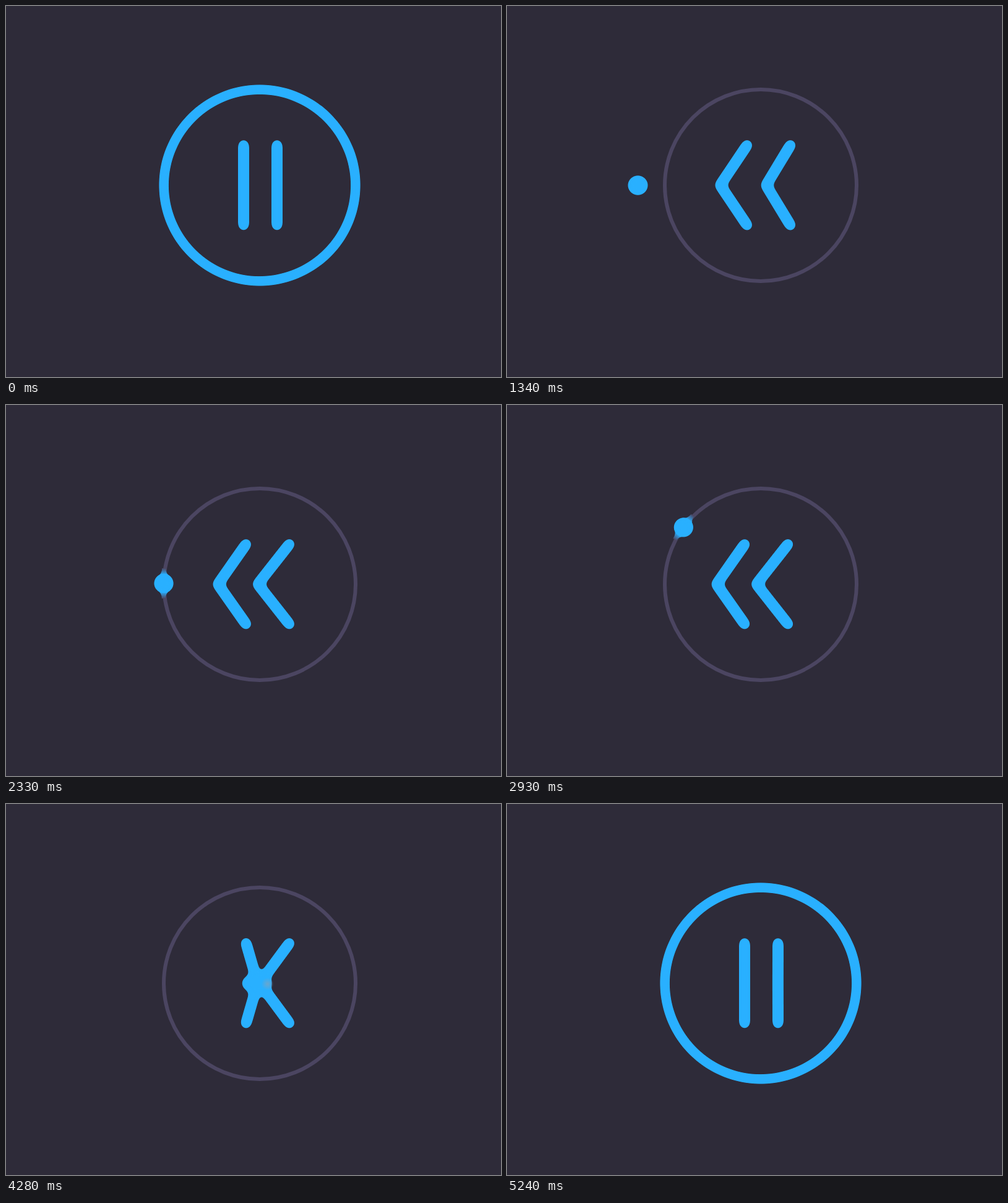
Recreate the animation shown at these times as an HTML page. Size 800 by 600 pixels, loop 5.27 s.

```html
<!DOCTYPE html>
<html lang="en">
<head>
<meta charset="utf-8">
<title>Pause and rewind</title>
<style>
  html, body { margin: 0; width: 100%; height: 100%; overflow: hidden; background: #2e2b39; }
  svg { display: block; width: 800px; height: 600px; }
  .line { fill: none; stroke: #29b0ff; stroke-linecap: round; stroke-linejoin: round; }
</style>
</head>
<body>
<svg viewBox="0 0 800 600">
  <defs>
    <filter id="goo" filterUnits="userSpaceOnUse" x="0" y="0" width="800" height="600" color-interpolation-filters="sRGB">
      <feGaussianBlur stdDeviation="4.5"/>
      <feColorMatrix values="1 0 0 0 0  0 1 0 0 0  0 0 1 0 0  0 0 0 12 -5.5"/>
    </filter>
    <linearGradient id="fade">
      <stop offset="0" stop-color="#4b4561"/>
      <stop offset=".22" stop-color="#29b0ff"/>
      <stop offset=".78" stop-color="#29b0ff"/>
      <stop offset="1" stop-color="#4b4561"/>
    </linearGradient>
    <radialGradient id="haze">
      <stop offset="0" stop-color="#7fa3bd" stop-opacity=".75"/>
      <stop offset="1" stop-color="#7fa3bd" stop-opacity="0"/>
    </radialGradient>
  </defs>
  <rect width="800" height="600" fill="#2e2b39"/>
  <circle cx="410" cy="290" r="155" fill="none" stroke="#4b4561" stroke-width="6"/>
  <path id="neckA" fill="url(#fade)"/>
  <path id="neckB" fill="url(#fade)"/>
  <g filter="url(#goo)">
    <path id="arc" class="line"/>
    <polyline id="left" class="line" stroke-width="18"/>
    <polyline id="right" class="line" stroke-width="18"/>
    <ellipse id="dot" fill="#29b0ff"/>
  </g>
  <circle id="glow" cy="291" r="10" fill="url(#haze)"/>
</svg>
<script>
const CX = 410, CY = 290, R = 155, LOOP = 5270;
const DOT = 15.5, BAND = 15.5;
const SPIN = 1607, TURN = 765, TURNS = 3, SPIN_END = SPIN + TURN * TURNS;
const SPREAD = 4540, END = 5240;

const el = id => document.getElementById(id);
const set = (id, attrs) => { for (const k in attrs) el(id).setAttribute(k, attrs[k]); };
const show = (id, on) => { el(id).style.display = on ? '' : 'none'; };

const clamp = v => Math.min(1, Math.max(0, v));
const span = (t, a, b) => clamp((t - a) / (b - a));
const sine = u => (1 - Math.cos(Math.PI * u)) / 2;
const glide = (t, a, b) => sine(span(t, a, b));
const easeOut = u => 1 - (1 - u) ** 2;
const orbitEase = u => u < .5 ? .5 * (2 * u) ** 2.2 : 1 - .5 * (2 - 2 * u) ** 2.6;

// Damped swing from 0 to 1, u in ms after the hit
const spring = u => u < 0 ? 0 : 1 - Math.exp(-u / 180) * Math.cos(u * .0385);

// The dot along the horizontal axis, before and after its orbits
const lineX = t => 565 + 44 * easeOut(span(t, 880, 1100))
  - 397.5 * glide(t, 1100, 1340) + 43.5 * glide(t, 1340, 1550)
  - 20 * glide(t, SPIN_END, 4157) + 354.5 * glide(t, 4157, 4409) - 24.5 * glide(t, 4409, 4550);

// The dot on the ring; angle 0 is left, counterclockwise
function orbitAt(t) {
  const turns = (t - SPIN) / TURN;
  const f = orbitEase(turns % 1);
  const a = f * 2 * Math.PI;
  const thin = glide(f, .03, .24) * (1 - glide(f, .5, .74));
  return { x: CX - R * Math.cos(a), y: CY + R * Math.sin(a), a, r: DOT - 4.5 * thin, speed: 0 };
}

function dotAt(t) {
  if (t >= SPIN && t < SPIN_END) return orbitAt(t);
  const x = lineX(t);
  return {
    x, y: CY,
    a: x < CX ? 0 : Math.PI,
    r: BAND / 2 + (DOT - BAND / 2) * glide(t, 680, 900),
    speed: lineX(t + 15) - lineX(t - 15)
  };
}

// Tapered bridge between a blob and the thin ring
function neck(id, a, r, reach) {
  show(id, reach > 0);
  const end = r + 9 * reach, x0 = r * .75, y0 = r * .64;
  const x = CX - R * Math.cos(a), y = CY + R * Math.sin(a);
  const side = s => `L${s * x0} ${-s * y0}Q${s * r} ${-s * 3} ${s * end} ${-s * 3}L${s * end} ${s * 3}Q${s * r} ${s * 3} ${s * x0} ${s * y0}`;
  set(id, {
    d: `M${-x0} ${-y0}${side(1)}${side(-1)}Z`,
    transform: `translate(${x} ${y}) rotate(${90 - a * 180 / Math.PI})`
  });
}

// A straight bar at x that bends into a chevron when hit, and back
function bar(id, t, x, tipX, bendX, hit, hitBack) {
  const drift = -4.5 * easeOut(span(t, 2340, 3300)) * (1 - glide(t, 3750, 4150));
  const tip = x + (tipX - x) * (glide(t, 1160, 1310) - glide(t, 4280, 4425)) + drift;
  const bend = x + (bendX - x) * (spring(t - hit) - spring(t - hitBack)) + drift;
  set(id, { points: `${tip},225 ${bend},289.8 ${tip},354.5` });
}

// Blue band reaching from the right side round to both ends
function band(half, width) {
  const h = Math.min(half, Math.PI - .0005);
  const x = CX + R * Math.cos(h), y = R * Math.sin(h);
  set('arc', {
    d: `M${x} ${CY - y}A${R} ${R} 0 0 1 ${CX + R} ${CY}A${R} ${R} 0 0 1 ${x} ${CY + y}`,
    'stroke-width': width
  });
  neck('neckA', Math.PI - half, width / 2, 1);
  neck('neckB', Math.PI + half, width / 2, 1);
}

function draw(t) {
  bar('left', t, 384, 388, 342.5, 1215, 4216);
  bar('right', t, 438, 458, 407, 1190, 4271);

  const late = t > SPIN;
  const grow = span(t, SPREAD, END);
  const half = Math.PI * (late ? easeOut(grow) : 1 - glide(t, 470, 900));
  const ringOn = half > .001;
  const d = dotAt(t);

  show('arc', ringOn);
  if (ringOn) {
    band(half, late ? 2 * DOT - (2 * DOT - BAND) * grow ** 1.4 : BAND);
  } else {
    const gap = Math.abs(Math.hypot(d.x - CX, d.y - CY) - R);
    neck('neckA', d.a, d.r, clamp(1 - gap / 18));
    show('neckB', false);
  }

  // The added radius makes up for what the filter eats
  const r = d.r + 10 / d.r, pace = Math.abs(d.speed);
  show('dot', t >= 680 && !(late && ringOn));
  set('dot', { cx: d.x, cy: d.y, rx: r + .13 * pace, ry: r });
  set('glow', { cx: d.x + 17 * Math.sign(d.speed), opacity: span(pace, 50, 62) });
}

// The picture moves in steps of 30 ms after an initial hold
const begin = performance.now();
function tick() {
  const t = (performance.now() - begin) % LOOP;
  draw(t < 500 ? 0 : 500 + Math.floor((t - 500) / 30) * 30);
  requestAnimationFrame(tick);
}
draw(0);
requestAnimationFrame(tick);
</script>
</body>
</html>
```
